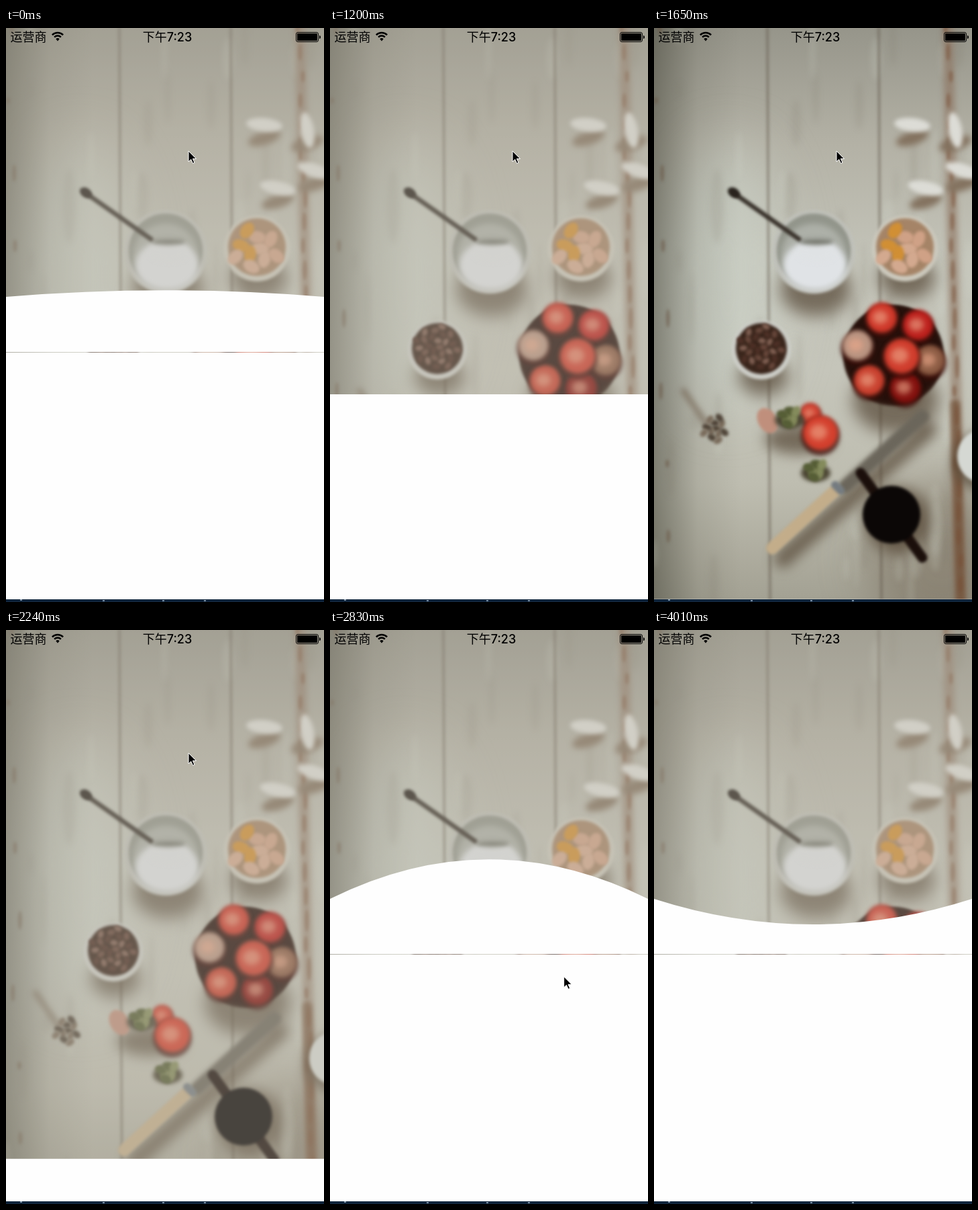
Animation, 474 px wide and 854 px high, one loop 4.13 s. Source, as an HTML page with a canvas:

```html
<!DOCTYPE html>
<html lang="zh">
<head>
<meta charset="utf-8">
<style>
html, body { margin: 0; width: 100%; height: 100%; overflow: hidden; background: #10253c; }
canvas, svg { position: absolute; left: 0; top: 0; }
text { font: 18px Inter, "Noto Sans CJK SC", "Noto Sans CJK", sans-serif; }
.time { font-weight: 500; text-anchor: middle; }
</style>
</head>
<body>
<canvas id="photo" width="474" height="850"></canvas>
<svg width="474" height="854" viewBox="0 0 474 854">
  <rect id="dim" width="474" height="850" fill="#bab4a7" fill-opacity=".35"/>
  <path id="panel" fill="#fefefe"/>
  <rect y="850" width="474" height="4" fill="#10253c"/>
  <path d="M21 851h3M144 852h3M233 852h3M295 852h3" stroke="#7e93a8" stroke-width="2"/>
  <text x="6.500" y="19.500">运营商</text>
  <text x="240.500" y="19.500" class="time">下午7:23</text>
  <path d="M68.900 10.400a11.500 11.500 0 0 1 16.200 0M72.100 13.600a7 7 0 0 1 9.800 0" fill="none" stroke="#000" stroke-width="2.500"/>
  <path d="M77 19.500l-2.700-3.200a4 4 0 0 1 5.400 0z"/>
  <rect x="432.500" y="6.500" width="33" height="14" rx="2.500" fill="none" stroke="#000"/>
  <rect x="434" y="8" width="30" height="11" rx="1"/>
  <path d="M467 11q2 0 2 2.500t-2 2.500z"/>
  <path id="cursor" d="M0 0V16L3.800 12.500L6.500 18.500L9 17.400L6.400 11.600H11.500Z" stroke="#fff"/>
</svg>
<script>
const $ = id => document.getElementById(id);
const ctx = $('photo').getContext('2d');
const SHADE = 'rgba(84,70,54,.7)';

let seed = 7;
const rand = (a, b) => {
  seed = (seed * 16807) % 2147483647;
  return a + (b - a) * seed / 2147483647;
};

function blob(x, y, rx, ry, color, blur = 2, turn = 0) {
  ctx.filter = `blur(${blur}px)`;
  ctx.fillStyle = color;
  ctx.beginPath();
  ctx.ellipse(x, y, rx, ry, turn, 0, 7);
  ctx.fill();
}

function line(x0, y0, x1, y1, width, color, blur = 2) {
  ctx.filter = `blur(${blur}px)`;
  ctx.strokeStyle = color;
  ctx.lineWidth = width;
  ctx.lineCap = 'round';
  ctx.beginPath();
  ctx.moveTo(x0, y0);
  ctx.lineTo(x1, y1);
  ctx.stroke();
}

function wash(x, y, ...colors) {
  const g = ctx.createLinearGradient(0, 0, x, y);
  colors.forEach((c, i) => g.addColorStop(i / (colors.length - 1), c));
  ctx.filter = 'none';
  ctx.fillStyle = g;
  ctx.fillRect(0, 0, 474, 850);
}

function bowl(x, y, r, rim, inside, wall) {
  blob(x + 3, y + r * .9, r * .85, r * .65, SHADE, 12);
  blob(x, y, r, r, rim);
  blob(x, y - 2, r - wall, r - wall, inside);
}

// fills a disc with pieces along a sunflower spiral
function scatter(x, y, r, count, size, colors, blur = 2) {
  for (let i = 0; i < count; i++) {
    const a = i * 2.4, d = r * Math.sqrt((i + .3) / count);
    blob(x + d * Math.cos(a), y + d * Math.sin(a), size, size * .7, colors[i % colors.length], blur, a * 2);
  }
}

function berry(x, y, r, color) {
  blob(x, y + 3, r, r, 'rgba(60,14,8,.75)', 3);
  blob(x, y - 2, r * .9, r * .9, color, 3);
  blob(x - r * .1, y - r * .1, r * .45, r * .4, 'rgba(238,170,140,.6)', 4);
}

function drawWood() {
  wash(0, 850, '#96958a', '#b3b1a5', '#c3c3b8', '#c5c5ba', '#bebdb0', '#a3a193');
  blob(110, 370, 80, 200, 'rgba(206,212,202,.6)', 40);
  blob(430, 790, 110, 120, 'rgba(108,94,76,.45)', 35);
  wash(130, 0, 'rgba(62,62,50,.5)', 'rgba(62,62,50,.12)', 'rgba(62,62,50,0)');
  for (let i = 0; i < 60; i++)
    blob(rand(0, 474), rand(0, 850), rand(3, 10), rand(12, 55),
      i % 2 ? 'rgba(120,112,98,.14)' : 'rgba(216,219,209,.18)', 4);
  for (const x of [170, 336]) line(x - 1, 0, x + 3, 850, 3, 'rgba(88,78,64,.55)');
  line(438, 0, 457, 850, 16, 'rgba(138,112,92,.6)', 4);
  line(449, 560, 457, 850, 15, 'rgba(108,70,44,.6)', 3);
  for (let i = 0; i < 24; i++) {
    const y = i * 36;
    blob(436 + y * .022 + rand(-3, 5), y, 3, rand(8, 18), 'rgba(120,78,52,.5)');
    if (i % 3 === 0) blob(rand(3, 24), y, 3, rand(5, 14), 'rgba(104,84,66,.5)');
  }
}

function drawCrumbs() {
  for (const [x, y, turn] of [[385, 144, .1], [449, 152, 1.4], [405, 238, .2], [460, 212, .3]]) {
    blob(x, y + 20, 25, 10, '#83725f', 5, -.3);
    blob(x, y, 27, 10, '#dcdcd6', 3, turn);
  }
}

function drawBowls() {
  bowl(238, 333, 62, '#c0c1ba', '#92958b', 7);
  blob(238, 338, 48, 47, '#adb0a8', 4);
  blob(240, 353, 47, 37, '#e0e3e6', 4);
  blob(243, 333, 30, 14, '#dfe2e4', 4);
  blob(242, 318, 25, 5, '#77796f', 3);
  line(118, 245, 216, 314, 7, '#38312a');
  blob(119, 245, 10, 7, '#29231d', 2, .6);

  bowl(374, 328, 49, '#cdcabe', '#a58467', 6);
  scatter(373, 328, 35, 10, 13, ['#d3a98f', '#d18f34', '#cfa186']);

  bowl(160, 479, 44, '#cecfc9', '#3a261c', 6);
  scatter(160, 475, 33, 26, 6, ['#66463a', '#4d3026', '#7d5d50']);

  bowl(357, 487, 75, '#2e1912', '#26100b', 4);
  const colors = ['#8c5c44', '#84120f', '#c9412f', '#b99481', '#cf382a', '#bd211d'];
  colors.forEach((c, i) => {
    const a = .2 + i * Math.PI / 3;
    berry(357 + 55 * Math.cos(a), 485 + 55 * Math.sin(a), 25, c);
  });
  berry(369, 490, 29, '#d03d2d');
}

function drawLoose() {
  blob(215, 612, 50, 22, SHADE, 10);
  blob(169, 584, 14, 20, '#c08f7c', 2, -.5);
  berry(233, 575, 17, '#d04030');
  berry(248, 604, 29, '#d4402e');
  for (const [x, y] of [[202, 577], [241, 656]]) {
    blob(x, y + 6, 22, 13, '#4c4634', 3);
    scatter(x, y, 13, 7, 9, ['#565e36', '#848b5c']);
  }
  line(44, 540, 80, 592, 9, 'rgba(112,96,78,.6)', 4);
  scatter(90, 596, 19, 12, 7, ['#51463a', '#7a6c5c']);
}

function drawTools() {
  line(192, 790, 408, 598, 26, SHADE, 9);
  line(285, 682, 400, 578, 20, '#6b665b', 3);
  line(176, 774, 268, 690, 18, '#c3ad8a');
  line(270, 680, 278, 688, 12, '#747b80');

  blob(362, 732, 50, 50, SHADE, 10);
  line(308, 662, 400, 788, 15, '#1b0f0b');
  blob(354, 724, 43, 43, '#0b0706');

  blob(484, 645, 40, 42, SHADE, 8);
  blob(491, 637, 39, 40, '#d5d8d3');
}

[drawWood, drawCrumbs, drawBowls, drawLoose, drawTools].forEach(draw => draw());

// critically damped approach from 0 to 1
function settle(t, start, rate) {
  const x = Math.max(0, t - start) * rate;
  return 1 - (1 + x) * Math.exp(-x);
}

// damped oscillation, highest at the time "peak"
const swing = (t, peak, height, decay) =>
  -height * Math.exp((peak - t) / decay) * Math.cos((t - peak) * Math.PI / 450);

function bendAt(t) {
  if (t < 1000) return swing(t, -92, 17, 275);
  if (t < 2650) return 0;
  return t < 3400 ? swing(t, 2770, 66, 2470) : swing(t, 3482, 55, 2470);
}

// the picture is refreshed in steps, slightly quicker in the second half
const step = t => t < 1650
  ? Math.floor(t / 150) * 150
  : 2240 + Math.floor((t - 2231) / 147.5) * 147.5;

function frame(now) {
  const t = step(now % 4130);
  const edge = 400 + 450 * (settle(t, 1140, .0193) - settle(t, 2206, .0193));
  const control = edge + 2 * bendAt(t);
  const seam = t < 1140 || t > 2600;
  $('panel').setAttribute('d', `M0 ${edge}Q237 ${control} 474 ${edge}` +
    (seam ? 'V482.3H0ZM0 483H474V850H0Z' : 'V850H0Z'));

  const open = t > 1600 && t < 2206;
  $('dim').style.display = open ? 'none' : '';

  const first = settle(t, 2657, .031), second = settle(t, 2960, .0107);
  const x = 272 + 79 * first + 48 * second, y = 183 + 343 * first + 329 * second;
  $('cursor').setAttribute('transform', `translate(${x} ${y})`);
  $('cursor').style.display = t > 3500 ? 'none' : '';
  requestAnimationFrame(frame);
}
requestAnimationFrame(frame);
</script>
</body>
</html>
```
